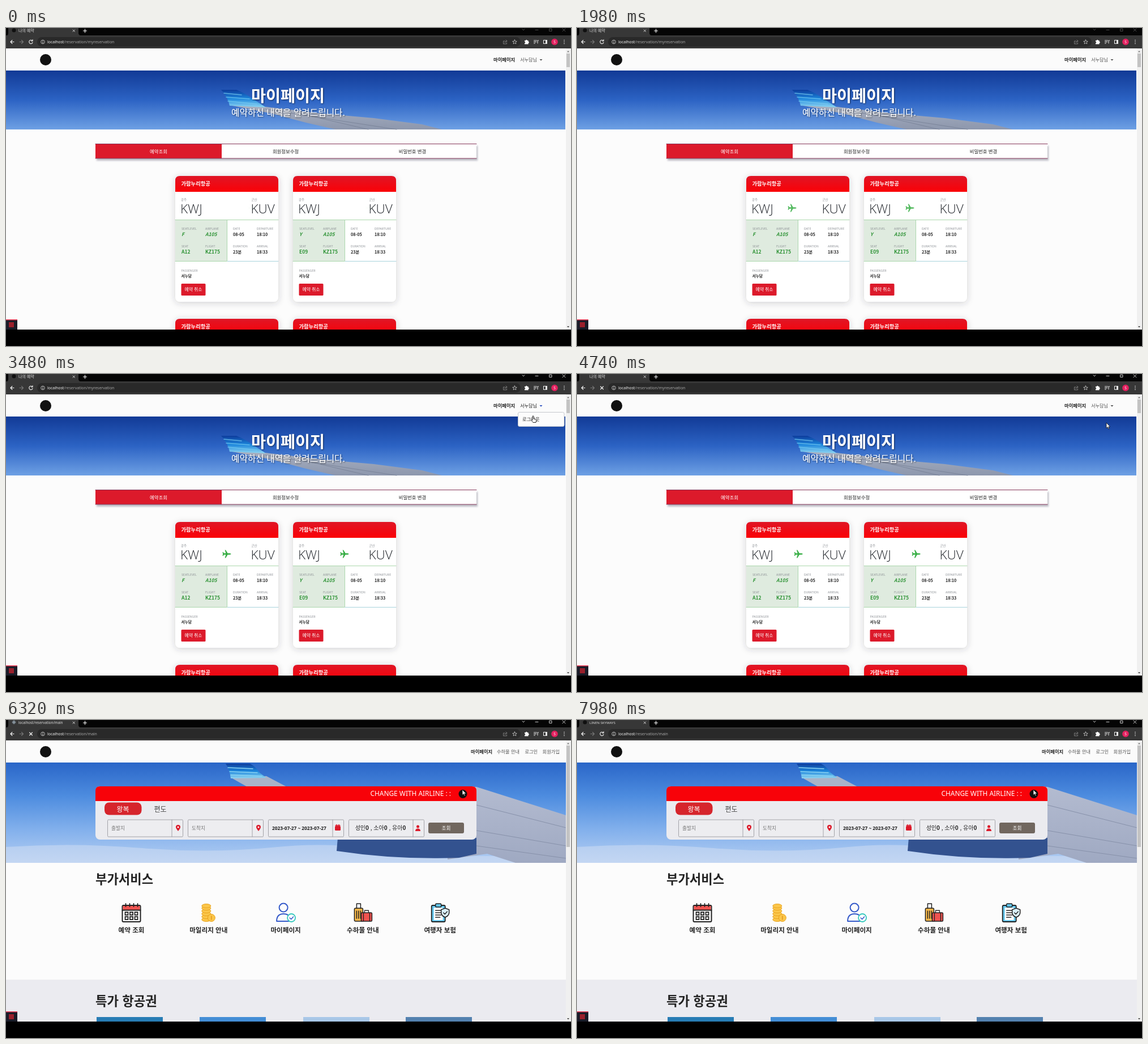
An HTML page for the animation above (8000 ms loop, 998x561 px).

```html
<!DOCTYPE html>
<html lang="ko">
<head>
<meta charset="utf-8">
<title>Reservation</title>
<style>
html, body { margin: 0; width: 100%; height: 100%; overflow: hidden; background: #000; }
svg { display: block; width: 100vw; height: 100vh; }
text { font-family: "Noto Sans CJK KR", "Noto Sans CJK JP", "Noto Sans CJK", "Noto Sans", sans-serif; white-space: pre; }
.latin { font-family: "Noto Sans", "Open Sans", sans-serif; }
.thin { font-family: "Open Sans", "Noto Sans", sans-serif; }
.mid { text-anchor: middle; }
.line { fill: none; stroke-linecap: round; stroke-linejoin: round; }
</style>
</head>
<body>
<svg id="stage" viewBox="0 0 998 561" xmlns="http://www.w3.org/2000/svg"></svg>
<script>
const LOOP = 8000;
const AIRLINE = "가람누리항공", PERSON = "서누담", SITE = "LINEN SKYWAYS";
const RED = "#dc1a2b", GREEN = "#2c9234";

const text = (x, y, size, str, fill = "#222", weight = 400, extra = "") =>
  `<text x="${x}" y="${y}" font-size="${size}" fill="${fill}" font-weight="${weight}" ${extra}>${str}</text>`;
const centered = (x, y, size, str, fill, weight) => text(x, y, size, str, fill, weight, 'class="mid"');
const latin = (x, y, size, str, fill, weight) => text(x, y, size, str, fill, weight, 'class="latin"');
const rect = (x, y, w, h, fill, extra = "") =>
  `<rect x="${x}" y="${y}" width="${w}" height="${h}" fill="${fill}" ${extra}/>`;
const circle = (x, y, r, fill, extra = "") => `<circle cx="${x}" cy="${y}" r="${r}" fill="${fill}" ${extra}/>`;
const shape = (d, fill, extra = "") => `<path d="${d}" fill="${fill}" ${extra}/>`;
const line = (d, stroke, width = 1, extra = "") =>
  `<path class="line" d="${d}" stroke="${stroke}" stroke-width="${width}" ${extra}/>`;
const group = (id, body, extra = "") => `<g id="${id}" ${extra}>${body}</g>`;
const at = (x, y, body) => `<g transform="translate(${x} ${y})">${body}</g>`;
const gradient = (id, ...stops) => `<linearGradient id="${id}" x2="0" y2="1">` +
  stops.map((c, i) => `<stop offset="${i / (stops.length - 1)}" stop-color="${c}"/>`).join("") + "</linearGradient>";

const defs = `<defs>
  ${gradient("sky", "#123a96", "#2c63c4", "#6ea0e4")}
  ${gradient("bigSky", "#2a66c8", "#4d8cdf", "#82b0ec", "#b4cef2")}
  ${gradient("wing", "#a7afc0", "#8d97ad")}
  ${gradient("bigWing", "#b3bbd0", "#9fa9c2")}
  ${gradient("tail", "#0d3c9c", "#1c86dc", "#8fd6f2")}
  ${gradient("cardHead", "#df1626", "#fb0006")}
  <filter id="soft" x="-20%" y="-20%" width="140%" height="140%">
    <feDropShadow dx="0" dy="2" stdDeviation="6" flood-color="#334" flood-opacity=".22"/></filter>
  <filter id="drop" x="-5%" y="-20%" width="110%" height="170%">
    <feDropShadow dx="2" dy="4" stdDeviation="1.5" flood-color="#334" flood-opacity=".3"/></filter>
  <filter id="glow"><feDropShadow dx="1" dy="1" stdDeviation="1" flood-color="#000" flood-opacity=".6"/></filter>
</defs>`;

function browser() {
  const light = "#dedede";
  const controls = line("M912 2l2 2 2-2M935 3.500h5M960 1.500h4v4h-4zM983 1l5 5M988 1l-5 5", light, .9);
  const host = (id, path) => group(id, latin(73, 27, 6.95,
    `<tspan fill="#f2f2f2">localhost</tspan>/reservation/${path}`, "#a5a5a5"));
  return rect(0, 0, 998, 36, "#050505") +
    shape("M2 13Q4 12 4 9V0H128V9Q128 12 131 13z", "#373737") + rect(0, 13, 998, 23, "#373737") +
    group("mark", circle(14, 4, 3.5, "#101010")) +
    group("globe", circle(14, 4, 3, "#66727c") + line("M11 4h6M14 1v6", "#b5c0c6", .6)) +
    group("titleOld", text(22, 7, 7, "나의 예약", light)) +
    group("titleUrl", latin(22, 7, 6.2, "localhost/reservation/main", light)) +
    group("titleNew", latin(22, 7, 6.1, SITE, light)) +
    line("M118 3l3.500 3.500M121.500 3L118 6.500", light, .9) + line("M136.500 5h6M139.500 2v6", "#fff", 1.1) +
    group("controls", controls) +
    line("M14 24.500H8M11 21.500l-3 3 3 3", "#f4f4f4", 1.1) + line("M24 24.500h6M27.500 21.500l3 3-3 3", "#777", 1.1) +
    group("reload", line("M46.500 22.500A3.200 3.200 0 1 0 47 25.500M47 20.500v2.500h-2.500", "#f4f4f4", 1.1)) +
    group("stop", line("M41.500 22l5 5M46.500 22l-5 5", "#f4f4f4", 1.1)) +
    rect(55, 16, 854, 17, "#292929", 'rx="8.500"') +
    line("M65 24v2.500", light, .9) + circle(65, 22.600, .5, light) + circle(65, 24.500, 3.300, "none", `stroke="${light}" stroke-width=".8"`) +
    host("urlOld", "myreservation") + host("urlNew", "main") +
    line("M881 23h-2.500v5h6v-2M881 26q0-3 4-3M883 21l2 2-2 2", "#8c8c8c", .8) +
    line("M898.500 20.800l1.100 2.500 2.700.2-2.100 1.800.7 2.600-2.400-1.400-2.400 1.400.7-2.600-2.100-1.800 2.700-.2z", "#d0d0d0", .8) +
    shape("M916 22h2a1.300 1.300 0 0 1 2.600 0h2v2a1.300 1.300 0 0 1 0 2.600v1.900h-6.600v-2a1.300 1.300 0 0 0 0-2.600z", "#fff") +
    line("M932.500 22h5M932.500 24.500h4M932.500 27h2M939 27v-5h1.500", "#eee", 1) +
    rect(949.5, 21.5, 6, 6, "none", 'stroke="#eee"') + rect(953, 21.5, 3, 6, "#eee") +
    circle(969, 24.500, 5.800, "#e3205f") + centered(969, 27, 6.5, "S", "#fff") +
    [21.5, 24.5, 27.5].map(y => circle(986, y, .8, "#eee")).join("");
}

const scrollbar = height => rect(989, 36, 9, 496, "#f0f0f0") + rect(990, 45, 6, height, "#c3c3c3") +
  shape("M991 42.500l2-2.500 2 2.500z", "#777") + shape("M991 526l2 2.500 2-2.500z", "#444");
const header = rect(0, 36, 989, 39, "#fbfbfb") + circle(70, 56, 10, "#111");

function tail(x, y) {
  return at(x, y, shape("M0 0H27Q40 5 53 14L79 31L15 28Q12 13 0 0z", "url(#tail)") +
    line("M5 6L36 9M9 13L50 16M12 20L63 25", "#75caf0", 1.5, 'opacity=".75"'));
}

function ticket(x, y, level, seat) {
  const field = (fx, fy, label, value, size, fill, extra = "") =>
    text(fx, fy, 5.2, label, "#8d9196") + text(fx, fy + 11.8, size, value, fill, 700, extra);
  const city = (cx, name, code) => text(cx + 1, 44, 5.4, name, "#8d9196") +
    text(cx, 66, 22.5, code, "#20242a", 300, 'class="thin"');
  const italic = 'font-style="italic"';
  return at(x, y, rect(0, 0, 182, 222, "#fff", 'rx="8" filter="url(#soft)"') +
    shape("M0 28V8Q0 0 8 0H174Q182 0 182 8V28z", "url(#cardHead)") +
    text(10.5, 17, 9.3, AIRLINE, "#fff", 700) +
    city(9, "광주", "KWJ") + city(133.5, "군산", "KUV") +
    rect(0, 78, 91, 72, "#dfebdf") +
    line("M0 77.500H182M91.500 78V150M0 150.500H91", "#abd7ad") + line("M92 150.500H182", "#a9d3dc") +
    field(11, 94.500, "SEATLEVEL", level, 8.5, GREEN, italic) +
    field(53, 94.500, "AIRPLANE", "A105", 8.5, GREEN, italic) +
    field(11, 125.500, "SEAT", seat, 8.5, GREEN) + field(53, 125.500, "FLIGHT", "KZ175", 8.5, GREEN) +
    field(102, 94.500, "DATE", "08-05", 7.2, "#222") + field(144, 94.500, "DEPARTURE", "18:10", 7.2, "#222") +
    field(102, 125.500, "DURATION", "23분", 7.2, "#222") + field(144, 125.500, "ARRIVAL", "18:33", 7.2, "#222") +
    text(10.5, 169, 5.2, "PASSENGER", "#8d9196") + text(10.5, 179, 6.7, PERSON, "#222", 700) +
    rect(10.5, 190, 43, 21, RED, 'rx="1.500"') + centered(32, 203, 7.9, "예약 취소", "#fff", 500) +
    `<path class="plane" fill="#35ad43" d="M8 0Q7-1.300 5-1.300H2L-1.500-7H-3L-1.300-1.300H-4.500L-6-3.200H-7.200L-6.400 0L-7.200 3.200H-6L-4.500 1.300H-1.300L-3 7H-1.500L2 1.300H5Q7 1.300 8 0z"/>`);
}

function bookings() {
  const hero = rect(0, 75, 988, 104, "url(#sky)") +
    shape("M395 136L458 139L560 151L650 159L735 170L770 179H582L530 167L470 151z", "url(#wing)") +
    line("M458 143L580 162L690 179M520 151L640 179", "#757f95", .8) + tail(380, 109) +
    `<g filter="url(#glow)">${centered(498, 130, 28.3, "마이페이지", "#fff", 700)}
     ${centered(498.5, 154.5, 15.7, "예약하신 내역을 알려드립니다.", "#fff")}</g>`;
  const tabs = rect(158, 204, 673, 26, "#fff", 'filter="url(#drop)"') + rect(158, 204, 223, 26, RED) +
    line("M158 204.500H831M158 230H831", "#86375a") +
    centered(269.5, 220.500, 8.4, "예약조회", "#fff", 500) + centered(494, 220.500, 8.4, "회원정보수정", "#222", 500) +
    centered(718, 220.500, 8.4, "비밀번호 변경", "#222", 500);
  const tickets = [261, 513].map(y => ticket(299, y, "F", "A12") + ticket(507, y, "Y", "E09")).join("");
  return rect(0, 36, 989, 496, "#fcfcfc") + header +
    text(861, 59, 8.3, "마이페이지", "#222", 700) +
    text(908, 59, 8.2, PERSON + "님", "#555", 400, 'id="user"') +
    `<path id="caret" d="M942.500 55h5l-2.500 2.700z"/>` +
    hero + tabs + tickets + scrollbar(24) +
    group("menu", rect(904.5, 67.5, 81.5, 25, "#fcfcfc", 'rx="2.500" stroke="#c5c8ce"') +
      text(912, 83, 8.3, "로그아웃", "#333"));
}

function serviceIcons() {
  const ink = "#222";
  const calendar = rect(-16, -13, 32, 29, "#fff", `rx="2" stroke="${ink}" stroke-width="2"`) +
    rect(-15, -12, 30, 7, "#ef5350") + line("M-16-4.500H16M-10-16v5M-3-16v5M4-16v5M11-16v5", ink, 1.8) +
    [-11, -2.5, 6].map(x => [-1, 7].map(y => rect(x, y, 5, 5, "none", `stroke="${ink}" stroke-width="1.800"`)).join("")).join("");
  const coin = (x, y) => `<ellipse cx="${x}" cy="${y}" rx="8" ry="3.500" fill="#fbc64a" stroke="#e9a21c"/>`;
  const coins = [12, 7, 2, -3, -8, -12].map(y => coin(-4, y)).join("") + circle(5, 9, 6.5, "#fbc64a", 'stroke="#e9a21c"') +
    line("M5 6v6", "#e08f19", 1.3);
  const member = circle(-4, -9, 7.5, "none", 'stroke="#3459c9" stroke-width="2"') +
    line("M6 15H-16Q-16 2-4 2Q2 2 5 5", "#3459c9", 2) + circle(10, 9, 7, "#fff", 'stroke="#35c9bd" stroke-width="1.800"') +
    line("M7 9l2.500 2.500L13.500 7", "#3459c9", 1.5);
  const bags = rect(-15, -8, 15, 23, "#f5b74a", `rx="2" stroke="${ink}" stroke-width="1.500"`) +
    line("M-11-8v-8h7v8M-11-3v13M-7.500-3v13M-4-3v13", ink, 1.5) +
    rect(-3, 0, 19, 15, "#ef5350", `rx="1.500" stroke="${ink}" stroke-width="1.500"`) + line("M3 0v-4h7v4M1 0v15M12 0v15", ink, 1.3);
  const policy = rect(-15, -13, 24, 29, "#65c7ee", `rx="2" stroke="${ink}" stroke-width="1.800"`) + rect(-11, -9, 16, 22, "#fff") +
    rect(-8, -16, 10, 6, "#65c7ee", `rx="1.500" stroke="${ink}" stroke-width="1.500"`) +
    line("M-8-4H2M-8 0H2M-8 4H2M-8 8H0", ink, 1.6) +
    shape("M9-8l7 2.500v6Q15 6 9 8Q3 6 2 .5v-6z", "#d9eef7", `stroke="${ink}" stroke-width="1.500"`) + line("M6 0l2.500 2.500L12.500-2", ink, 1.4);
  return [["예약 조회", calendar], ["마일리지 안내", coins], ["마이페이지", member], ["수하물 안내", bags], ["여행자 보험", policy]]
    .map(([label, icon], i) => at(221.5 + i * 136.3, 340, icon + centered(0, 34.500, 11.6, label, "#222", 700))).join("");
}

function searchBox() {
  const pin = x => shape(`M${x} 196Q${x - 4} 191 ${x - 4} 189a4 4 0 0 1 8 0Q${x + 4} 191 ${x} 196z`, RED) + circle(x, 189, 1.5, "#fff");
  const fields = [179, 321, 463, 605].map(x =>
    rect(x + .5, 176, 133, 30, "#ededf0", 'rx="1.500" stroke="#a3a3a8"') + line(`M${x + 114} 176v30`, "#a3a3a8")).join("");
  return rect(158, 117, 673, 94, "#ebebef", 'rx="8"') + shape("M158 143V125Q158 117 166 117H823Q831 117 831 125V143z", "#f80209") +
    latin(643.5, 134, 11.9, "CHANGE WITH AIRLINE : :", "#fff") + circle(807, 130.500, 7.5, "#111") +
    rect(174, 145.5, 65.5, 22, "#d6252c", 'rx="8"') + centered(206.5, 161.500, 12, "왕복", "#fff") +
    centered(272.5, 161.500, 12, "편도", "#444") + fields +
    text(186, 193.500, 8.7, "출발지", "#777") + text(328, 193.500, 8.7, "도착지", "#777") + pin(304) + pin(446) +
    latin(470, 194, 8.3, "2023-07-27 ~ 2023-07-27", "#222", 700) +
    centered(661.5, 194, 10, ["성인", "소아", "유아"].map(s => `${s}<tspan font-weight="700">0</tspan>`).join(" , ")) +
    rect(581, 187, 10, 8, RED, 'rx="1.500"') + line("M582 186h8M584 184.500v2M588 184.500v2", RED, 1.3) +
    circle(727.5, 188, 2.500, RED) + shape("M723 196Q723 191.500 727.500 191.500T732 196z", RED) +
    rect(746, 181, 63, 19, "#71675f", 'rx="3"') + centered(777.5, 193.500, 8.7, "조회", "#fff");
}

function home() {
  const hero = rect(0, 75, 989, 177, "url(#bigSky)") +
    shape("M0 224Q120 216 240 226T480 224T720 240H989V252H0z", "#d3e0f4", 'opacity=".5"') +
    shape("M831 118L989 168V252H900L850 236L780 246V118z", "url(#bigWing)") +
    line("M831 150L989 190M831 195L989 222M831 222L989 244", "#8791aa", 1) +
    shape("M586 208H831V236L800 243Q690 247 584 231z", "#33528f") +
    at(388, 77, shape("M10 25L72 22L110 42H40z", "#a9b3c8") +
      shape("M0 0H43Q54 6 60 16L72 25L9 26Q7 10 0 0z", "url(#tail)") + line("M4 7L48 9M7 14L56 16M9 20L64 22", "#8bd4f3", 1.4));
  const nav = text(821, 59, 8.3, "마이페이지", "#222", 700) + text(867, 59, 8.2, "수하물 안내", "#555") +
    text(916.5, 59, 8.2, "로그인", "#555") + text(947.5, 59, 8.3, "회원가입", "#555");
  const deals = [[160, "#287db5"], [342, "#448ed6"], [525, "#a9c8e8"], [706, "#5482b0"]]
    .map(([x, fill]) => rect(x, 524, 117, 8, fill)).join("");
  return rect(0, 36, 989, 496, "#fcfcfc") + header + nav + hero + searchBox() +
    text(158, 289, 22.2, "부가서비스", "#222", 700) + serviceIcons() +
    rect(0, 458, 989, 74, "#ebebf0") + text(158, 504, 22.3, "특가 항공권", "#222", 700) + deals + scrollbar(179);
}

const pointer = group("pointer",
  group("arrow", shape("M0 0V9.500L2.200 7.500L3.800 11L5.300 10.300L3.700 7H6.700z", "#fff", 'stroke="#111" stroke-width=".8"')) +
  group("hand", shape("M-1-.500Q0-2 1-.500V4L4.500 5Q6 5.400 5.700 7L5 10.500H0L-3.500 6.300Q-3.500 4.800-1 6.500z", "#fff", 'stroke="#111" stroke-width=".9"')));

document.getElementById("stage").innerHTML = defs + group("bookings", bookings()) + group("home", home()) + browser() +
  rect(0, 532, 998, 29, "#000") + rect(0, 514, 20, 18, "#1a1c28") + rect(0, 514, 20, 1.5, "#f0405a") + rect(5, 519, 9, 9, "#9a202c") + pointer;

const $ = id => document.getElementById(id);
const planes = document.querySelectorAll(".plane");

// Each part is visible from its first time up to its second.
const shown = {
  bookings: [0, 6300], home: [6300, LOOP], menu: [3080, 4300],
  titleOld: [0, 5100], titleUrl: [5100, 6400], titleNew: [6400, LOOP], globe: [5100, 6400],
  urlOld: [0, 5100], urlNew: [5100, LOOP], stop: [4350, 6700],
  pointer: [2600, LOOP], hand: [2900, 4350]
};
const pointerPath = [[2600, 960, 130], [2900, 925, 57], [3150, 925, 57], [3440, 931, 75], [4300, 931, 75],
  [4700, 935, 86], [5050, 935, 86], [5750, 807, 122], [6200, 806, 123]];
const planePhase = [[0, .9], [1980, 2.22], [3480, 3.36], [4740, 4.42], [5900, 5.48], [8000, 7.3]];

function sample(keys, t) {
  if (t <= keys[0][0]) return keys[0].slice(1);
  const i = keys.findIndex(k => k[0] > t);
  if (i < 0) return keys[keys.length - 1].slice(1);
  const [a, b] = [keys[i - 1], keys[i]], p = (t - a[0]) / (b[0] - a[0]);
  return a.slice(1).map((v, n) => v + (b[n + 1] - v) * p);
}

// The CSS "ease" curve.
function ease(x) {
  const curve = (u, a, b) => 3 * u * (1 - u) ** 2 * a + 3 * u * u * (1 - u) * b + u ** 3;
  let low = 0, high = 1;
  for (let i = 0; i < 20; i++) {
    const u = (low + high) / 2;
    if (curve(u, .25, .25) < x) low = u; else high = u;
  }
  return curve(low, .1, 1);
}

function show(id, on) { $(id).style.display = on ? "" : "none"; }

function draw(t) {
  const during = id => t >= shown[id][0] && t < shown[id][1];
  for (const id in shown) show(id, during(id));
  show("mark", t < 4350 || t >= 6400);
  show("reload", !during("stop"));
  show("arrow", !during("hand"));
  $("controls").setAttribute("opacity", t < 2600 ? .35 : 1);
  $("user").setAttribute("fill", during("hand") ? "#222" : "#555");
  $("caret").setAttribute("fill", during("menu") ? "#2a4fc0" : "#555");
  $("pointer").setAttribute("transform", `translate(${sample(pointerPath, t)})`);

  const phase = sample(planePhase, t)[0] % 1;
  const out = phase > .4, p = ease(out ? (phase - .4) / .6 : phase / .4);
  planes.forEach(plane => {
    plane.setAttribute("transform", `translate(${out ? 91 + 45 * p : 23 + 68 * p} 56.500)`);
    plane.setAttribute("opacity", out ? 1 - p : p);
  });
}

const start = performance.now();
function tick() {
  draw((performance.now() - start) % LOOP);
  requestAnimationFrame(tick);
}
tick();
</script>
</body>
</html>
```
